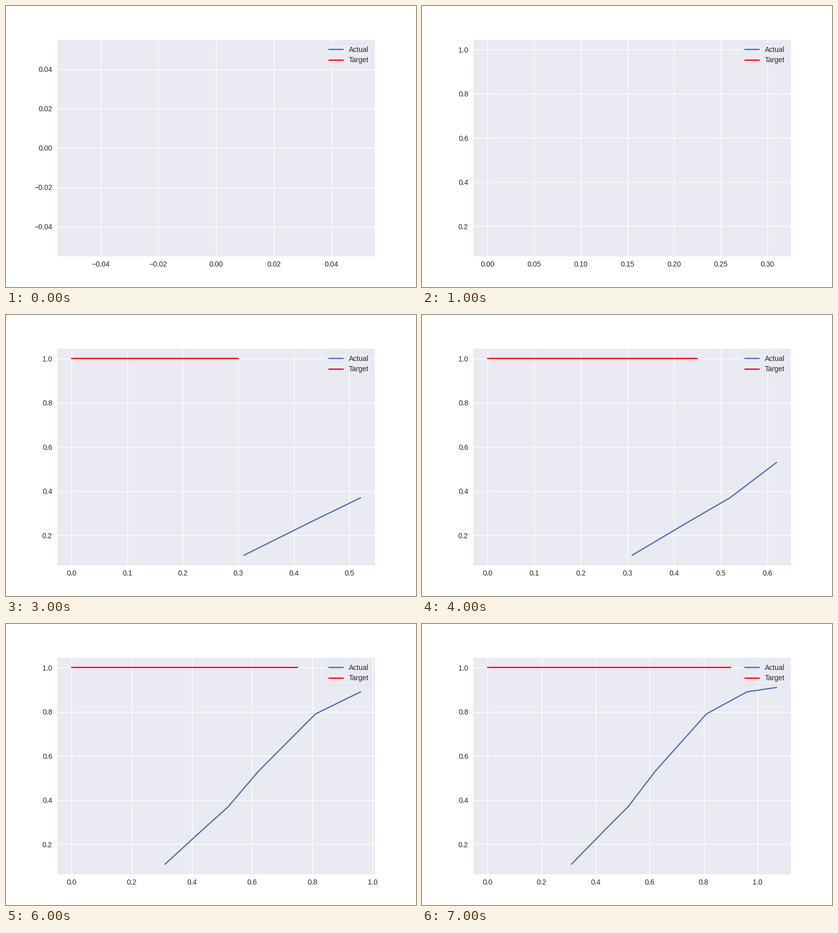
A matplotlib script that plays this animation: 800 px wide and 550 px high, repeating every 8 s.

```python
import matplotlib.pyplot as plt
import numpy as np
from matplotlib.animation import FuncAnimation

plt.rcParams.update({
    "font.family": "Liberation Sans",
    "font.size": 10,
    "text.color": ".15",
    "figure.facecolor": "white",
    "axes.facecolor": "#EAEAF2",
    "axes.edgecolor": "white",
    "axes.linewidth": 0,
    "axes.grid": True,
    "axes.axisbelow": True,
    "grid.color": "white",
    "grid.linestyle": "-",
    "grid.linewidth": 1,
    "lines.linewidth": 1.75,
    "lines.solid_capstyle": "round",
    "patch.linewidth": 0.3,
    "xtick.color": ".15",
    "ytick.color": ".15",
    "xtick.major.size": 0,
    "ytick.major.size": 0,
    "xtick.major.pad": 7,
    "ytick.major.pad": 7,
})

ACTUAL = np.array([
    (0.31, 0.11), (0.43, 0.26), (0.52, 0.37), (0.62, 0.53),
    (0.81, 0.79), (0.96, 0.89), (1.07, 0.91),
])
TARGET = np.array([(0.15 * i, 1.0) for i in range(len(ACTUAL))])

fig, ax = plt.subplots(figsize=(8, 5.5), dpi=100)
actual_line, = ax.plot([], [], color="#4C72B0", label="Actual")
target_line, = ax.plot([], [], color="red", label="Target")
ax.legend(loc="upper right", frameon=True)


def draw(count):
    """Show the first `count` points of each line and refit the axes."""
    for line, points in ((actual_line, ACTUAL), (target_line, TARGET)):
        line.set_data(points[:count, 0], points[:count, 1])
    ax.relim()
    ax.autoscale_view()
    return actual_line, target_line


anim = FuncAnimation(fig, draw, frames=len(ACTUAL) + 1, interval=1000,
                     init_func=lambda: draw(0), repeat=True, repeat_delay=0)
plt.show()
```
